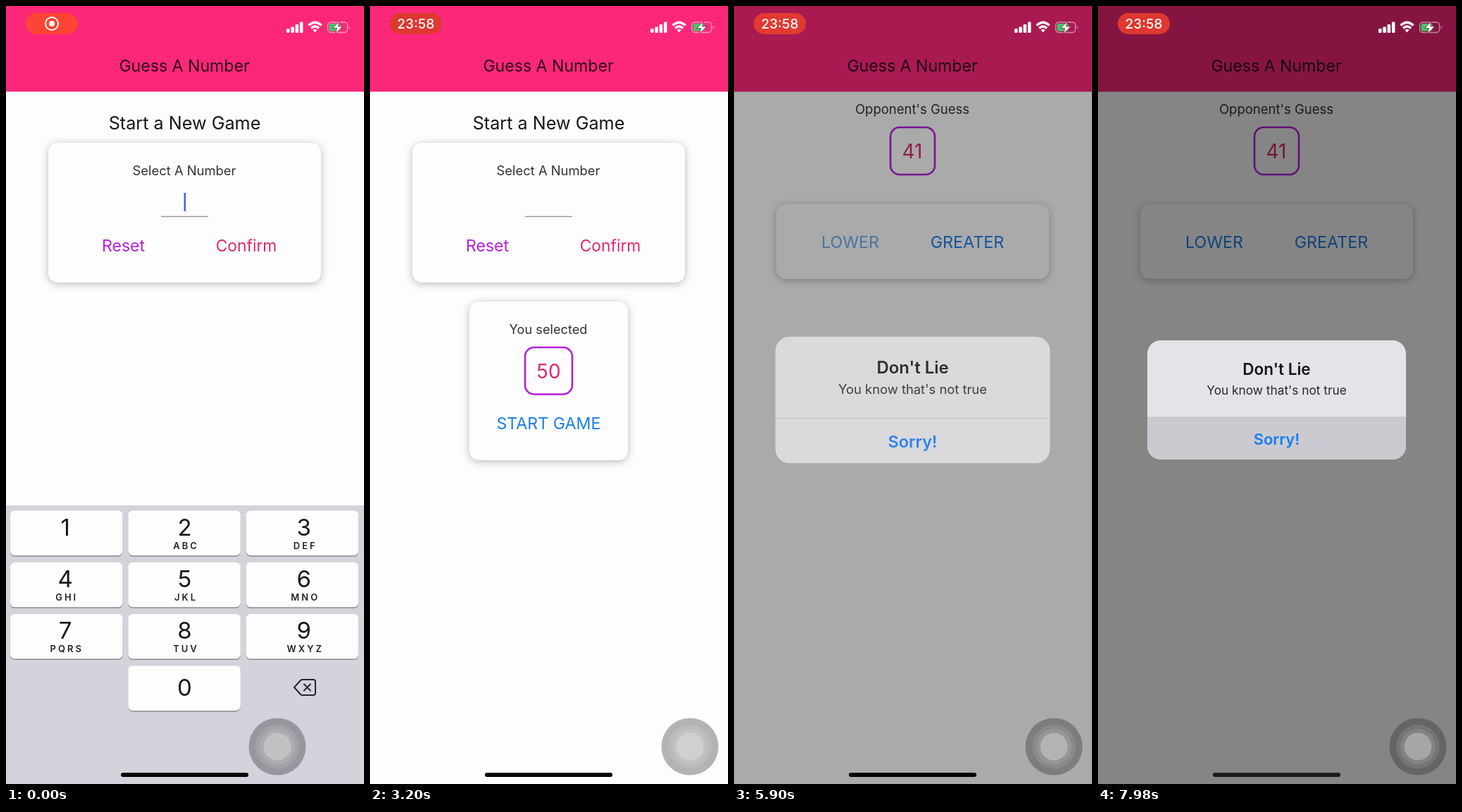
Write an HTML page that moves like this. It is 508 by 1103 pixels and loops after 8000 ms.

```html
<!DOCTYPE html>
<html lang="en">
<head>
<meta charset="utf-8">
<title>Guess A Number</title>
<style>
  html, body { margin: 0; width: 100%; height: 100%; overflow: hidden; background: #fdfdfd; }
  svg { display: block; width: 508px; height: 1103px; font-family: Inter, Roboto, sans-serif; }
  text { text-anchor: middle; }
  .card { fill: #fdfdfd; filter: drop-shadow(0 2px 6px #281e3c50); }
  .blue { fill: #1b7fe8; }
  .pink { fill: #de2872; }
  .box { fill: none; stroke: #b51fdd; stroke-width: 2.6; }
</style>
</head>
<body>
<svg viewBox="0 0 508 1103">
  <rect width="508" height="1103" fill="#fdfdfd"/>
  <rect width="508" height="121.5" fill="#fc2779"/>
  <text x="253" y="93" font-size="23.1" fill="#2b0a1c">Guess A Number</text>

  <g id="start">
    <text x="253.5" y="174.5" font-size="25.2" fill="#17171a">Start a New Game</text>
    <rect class="card" x="60" y="194" width="387" height="198" rx="14"/>
    <text x="253" y="240" font-size="18.4" fill="#333338">Select A Number</text>
    <text id="entry" x="253" y="287" font-size="23" fill="#222"></text>
    <rect id="caret" y="265" width="2.6" height="26" fill="#4169d8"/>
    <path d="M220 298.500H287" stroke="#999aa3" stroke-width="1.6"/>
    <text x="166.5" y="348" font-size="23" fill="#b51fdd">Reset</text>
    <text id="confirm" class="pink" x="341" y="348" font-size="22.8">Confirm</text>
    <g id="chosen">
      <rect class="card" x="141" y="419" width="225" height="225" rx="14"/>
      <text x="253" y="464.5" font-size="18.2" fill="#333338">You selected</text>
      <rect class="box" x="220" y="484" width="67" height="66.5" rx="13"/>
      <text class="pink" x="253.5" y="528" font-size="28">50</text>
      <text id="startBtn" class="blue" x="253.5" y="600" font-size="23.2">START GAME</text>
    </g>
  </g>

  <g id="game">
    <text x="253" y="153" font-size="18.5" fill="#333338">Opponent's Guess</text>
    <rect class="box" x="222" y="172" width="63" height="67" rx="13"/>
    <text class="pink" x="253" y="216" font-size="28">41</text>
    <rect class="card" x="60" y="281" width="387" height="106" rx="14"/>
    <text id="lower" class="blue" x="165" y="343" font-size="23.2">LOWER</text>
    <text class="blue" x="331" y="343" font-size="23.3">GREATER</text>
  </g>

  <g id="keyboard">
    <rect y="708" width="508" height="395" fill="#d4d3db"/>
    <g id="keys"></g>
    <g fill="none" stroke="#25252a" stroke-width="2" stroke-linejoin="round" stroke-linecap="round">
      <path d="M409 966L418 956Q419 955 421 955H436Q439 955 439 958V974Q439 977 436 977H421Q419 977 418 976Z"/>
      <path d="M423 961.500L432 970.500M432 961.500L423 970.500"/>
    </g>
  </g>

  <rect id="dim" width="508" height="1103" fill="#000"/>

  <g id="alert">
    <rect x="70" y="474" width="367" height="169" rx="19" fill="#e4e3e7"/>
    <path id="pressed" d="M70 583H437V624A19 19 0 0 1 418 643H89A19 19 0 0 1 70 624Z" fill="#cbcad0"/>
    <path d="M70 583H437" stroke="#c3c2c8" stroke-width="1"/>
    <text x="253.5" y="523" font-size="22.5" font-weight="600" fill="#151518">Don't Lie</text>
    <text x="253.5" y="550.5" font-size="17.3" fill="#29292d">You know that's not true</text>
    <text x="253.5" y="622" font-size="22" font-weight="600" fill="#147df5">Sorry!</text>
  </g>

  <g id="status">
    <rect id="pill" x="28" y="10" width="74" height="30" rx="15"/>
    <g id="record" fill="none" stroke="#fff" stroke-width="2">
      <circle cx="65" cy="25" r="9"/>
      <circle cx="65" cy="25" r="4" fill="#fff" stroke="none"/>
    </g>
    <text id="clock" x="65" y="32" font-size="19" font-weight="500" fill="#fff">23:58</text>
    <g fill="#fff">
      <rect x="398" y="32" width="4.5" height="6" rx="1.3"/>
      <rect x="404.3" y="29.5" width="4.5" height="8.5" rx="1.3"/>
      <rect x="410.6" y="26" width="4.5" height="12" rx="1.3"/>
      <rect x="416.9" y="22.5" width="4.5" height="15.5" rx="1.3"/>
    </g>
    <g fill="none" stroke="#fff" stroke-width="3.3">
      <path d="M429.500 27.500Q438.500 19 447.500 27.500M433 31.500Q438.500 26.500 444 31.500"/>
      <path d="M435.500 34Q438.500 31.500 441.500 34L438.500 37.500Z" fill="#fff" stroke="none"/>
    </g>
    <rect x="456.5" y="23" width="28" height="14.5" rx="4.5" fill="none" stroke="#fff" stroke-opacity=".5" stroke-width="1.4"/>
    <rect x="458.5" y="25" width="16" height="10.5" rx="2.5" fill="#43c767"/>
    <path d="M486.500 28Q489 30 486.500 33Z" fill="#fff" fill-opacity=".5"/>
    <path d="M473 22L463.500 31.500H469.500L467.500 39L478 29H471.500Z" fill="#fff" stroke="#7d1b45" stroke-width=".8"/>
  </g>

  <g id="touch">
    <circle r="40.5" fill="#28272d" fill-opacity=".35"/>
    <circle r="31" fill="#fff" fill-opacity=".1"/>
    <circle r="25" fill="#fff" fill-opacity=".1"/>
    <circle r="19.5" fill="#eaeaea" fill-opacity=".34"/>
  </g>
  <rect id="home" x="163" y="1087" width="181" height="6" rx="3"/>
</svg>
<script>
const $ = id => document.getElementById(id);
const LOOP = 8000;
const clamp = v => Math.min(1, Math.max(0, v));
const ramp = (t, from, to) => clamp((t - from) / (to - from));
const easeOut = p => 1 - (1 - p) ** 3;
const smooth = p => p * p * (3 - 2 * p);
const show = (id, on) => { $(id).style.display = on ? '' : 'none'; };
const fade = (id, v) => $(id).setAttribute('opacity', v);

const letters = ['', 'ABC', 'DEF', 'GHI', 'JKL', 'MNO', 'PQRS', 'TUV', 'WXYZ', ''];
$('keys').innerHTML = letters.map((label, i) => {
  const last = i === 9;
  const col = last ? 1 : i % 3;
  const x = 6 + col * 167.3;
  const y = 715.5 + Math.floor(last ? 3 : i / 3) * 73.3;
  const mid = 253.5 + (col - 1) * 169.3;
  const digit = (i + 1) % 10;
  return `<rect x="${x}" y="${y + 1.5}" width="159.5" height="63.5" rx="6.5" fill="#8d8c93"/>
    <rect id="key${digit}" x="${x}" y="${y}" width="159.5" height="63.5" rx="6.5" fill="#fdfdfd"/>
    <text x="${mid}" y="${y + (last ? 43 : 35)}" font-size="33" fill="#19191c">${digit}</text>
    <text x="${mid + 2}" y="${y + 54}" font-size="13" font-weight="600" letter-spacing="3" fill="#222226">${label}</text>`;
}).join('');

// Opacity of a button that is held between two times, then released.
const press = (t, down, up) =>
  1 - 0.75 * ramp(t, down, down + 90) * (1 - ramp(t, up, up + 260));

function draw(t) {
  const typed = t < 700 ? '' : t < 1220 ? '5' : t < 2160 ? '50' : '';
  $('entry').textContent = typed;
  show('caret', t < 2160 && (t % 1000 < 560 || typed && t < 1500));
  $('caret').setAttribute('x', 252.5 + typed.length * 7.5);
  $('key5').setAttribute('fill', t > 680 && t < 800 ? '#b9b8c1' : '#fdfdfd');
  $('key0').setAttribute('fill', t > 1200 && t < 1320 ? '#b9b8c1' : '#fdfdfd');

  show('start', t < 4150);
  show('game', t >= 4150);
  show('chosen', t >= 2160);
  fade('confirm', press(t, 2020, 2270));
  fade('startBtn', press(t, 4000, 4150));
  fade('lower', 1 - 0.4 * ramp(t, 5650, 5730) * (1 - ramp(t, 5880, 6100)));

  const slide = ramp(t, 2172, 2672);
  $('keyboard').setAttribute('transform', `translate(0 ${395 * easeOut(slide)})`);
  show('keyboard', slide < 1);
  const touchX = 385 + 69 * smooth(ramp(t, 2065, 2565));
  $('touch').setAttribute('transform', `translate(${touchX} 1050)`);

  const appear = easeOut(ramp(t, 5755, 6205));
  fade('dim', 0.475 * appear);
  const scale = 1.2 - 0.2 * appear;
  $('alert').setAttribute('transform', `translate(253.5 558.5) scale(${scale}) translate(-253.5 -558.5)`);
  fade('alert', clamp(appear * 1.2));
  show('alert', appear > 0);
  fade('pressed', ramp(t, 7800, 7880));
  $('home').setAttribute('fill', appear > 0.9 ? '#1d1b22' : '#050505');

  const glow = 0.5 + 0.5 * Math.cos((t - 2005) / 2390 * 2 * Math.PI);
  const bright = smooth(clamp(glow * 1.4));
  $('pill').setAttribute('fill', `rgb(${222 + 33 * bright},${56 + 12 * bright},${48 + 4 * bright})`);
  const swap = ramp(t, 500, 800);
  fade('record', 1 - swap);
  fade('clock', swap);
}

const begin = performance.now();
function tick(now) {
  draw(Math.max(0, now - begin) % LOOP);
  requestAnimationFrame(tick);
}
draw(0);
requestAnimationFrame(tick);
</script>
</body>
</html>
```
